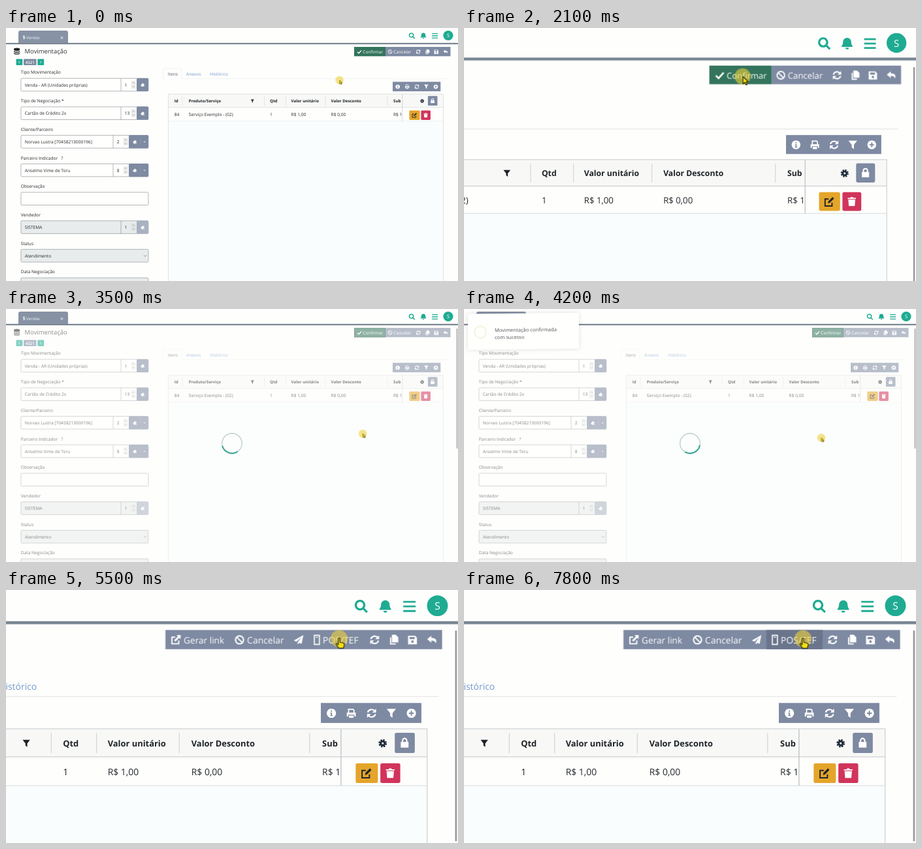
An HTML page that plays this animation: 692 px wide and 388 px high, repeating every 8 s.

```html
<!DOCTYPE html>
<html lang="pt-BR">
<head>
<meta charset="utf-8">
<title>Movimentação</title>
<style>
html, body { margin: 0; width: 100%; height: 100%; overflow: hidden; background: #fefefc; }
svg { display: block; }
#stage { width: 100vw; height: 100vh; }
text { font-family: "Open Sans", "Noto Sans", sans-serif; text-rendering: geometricPrecision; white-space: pre; }
.anim { animation: 8s infinite ease-in-out; }
.step { animation: 8s infinite step-end; }

#camera { transform-origin: 692px 0; animation-name: camera; }
@keyframes camera {
  0%, 12.5% { transform: scale(1); }
  20.6%, 30% { transform: scale(1.99); }
  35.6%, 55% { transform: scale(1); }
  62.5%, 100% { transform: scale(2.1); }
}
#cursor { animation-name: cursor; }
@keyframes cursor {
  0%, 1.25% { transform: translate(510.5px, 80px); }
  5%, 12.5% { transform: translate(530px, 69px); }
  22.5% { transform: translate(566px, 47px); }
  26%, 30% { transform: translate(558.6px, 37.3px); }
  36.2% { transform: translate(543px, 163px); }
  41% { transform: translate(546px, 190px); }
  51%, 53.5% { transform: translate(547px, 197.5px); }
  62.5% { transform: translate(612px, 50px); }
  65% { transform: translate(606px, 36px); }
  68.75% { transform: translate(605.3px, 35.4px); }
  78%, 82.5% { transform: translate(601.1px, 36px); }
  92.5%, 95% { transform: translate(606px, 36.2px); }
  97.4%, 100% { transform: translate(609.6px, 35.5px); }
}
.before { animation-name: before; }
@keyframes before { 0% { opacity: 1; } 53.75%, 100% { opacity: 0; } }
.after { animation-name: after; }
@keyframes after { 0% { opacity: 0; } 53.75%, 100% { opacity: 1; } }
.arrow { animation-name: arrow; }
@keyframes arrow { 0% { opacity: 1; } 65%, 100% { opacity: 0; } }
.hand { animation-name: hand; }
@keyframes hand { 0% { opacity: 0; } 65%, 100% { opacity: 1; } }
#focus { animation-name: focus; }
@keyframes focus { 0% { opacity: 0; } 28.75%, 100% { opacity: 1; } }
#bar { animation-name: bar; }
@keyframes bar { 0% { opacity: 0; } 12.5%, 100% { opacity: 1; } }
#hover { animation-name: hover; }
@keyframes hover { 0%, 68.8% { opacity: 0; } 71.25%, 100% { opacity: 1; } }
#loading { animation-name: loading; }
@keyframes loading { 0%, 37.5% { opacity: 0; } 40%, 53.1% { opacity: 1; } 54.2%, 100% { opacity: 0; } }
#arc { transform-origin: 346px 206px; animation: spin .8s linear infinite; }
@keyframes spin { from { transform: rotate(-80deg); } to { transform: rotate(280deg); } }
#toast { transform-origin: 91px 33px; animation-name: toast; }
@keyframes toast {
  0%, 49.5% { opacity: 0; transform: translateY(-5px) rotate(2deg); }
  51.7% { opacity: 1; transform: rotate(-2deg); }
  53.7% { transform: translateY(2px) rotate(2deg); }
  55.9%, 100% { opacity: 1; transform: none; }
}
#tick { stroke-dasharray: 14; animation-name: tick; }
@keyframes tick { 0%, 52.6% { stroke-dashoffset: 14; opacity: 0; } 53% { opacity: 1; } 57%, 100% { stroke-dashoffset: 0; opacity: 1; } }
</style>
</head>
<body>
<svg id="stage" viewBox="0 0 692 388" preserveAspectRatio="none">
  <g id="camera" class="anim">
    <g id="page"></g>
    <g id="loading" class="anim">
      <path d="M0 25.5H692V388H0z" fill="#fefefc" opacity=".45"/>
      <circle cx="346" cy="206" r="15.3" fill="none" stroke="#bccfcc" stroke-width="1.4"/>
      <path id="arc" d="M361.3 206A15.3 15.3 0 0 1 340.8 220.4" fill="none" stroke="#1f9d88" stroke-width="1.8"/>
    </g>
    <g id="bar" class="step" fill="#8d9299">
      <rect class="step before" x="689.9" y="30" width="1.2" height="184" rx=".6"/>
      <rect class="step after" x="689.9" y="29.5" width="1.2" height="154" rx=".6"/>
    </g>
    <g id="toast" class="anim">
      <rect x="6" y="6" width="170" height="55" rx="2.5" fill="#fffffd" style="filter: drop-shadow(0 0 3px #0002)"/>
      <circle cx="25" cy="34" r="9" fill="none" stroke="#e8efd2" stroke-width="1.3"/>
      <path id="tick" class="anim" d="M20.5 34.5l3.2 3.2 6-6.6" fill="none" stroke="#a5dc86" stroke-width="1.6"/>
      <g id="message"></g>
    </g>
    <g id="cursor" class="anim">
      <circle r="6.2" fill="#efd03a" opacity=".6"/>
      <g transform="translate(.3 .2) scale(.86)" fill="#f4e010" stroke="#23230f" stroke-width=".65" stroke-linejoin="round">
        <path class="step arrow" d="M0 0V6.5L1.6 5.1 2.7 7.5 3.8 7 2.7 4.7H4.8z"/>
        <path class="step hand" d="M-1 0c0-1 1.4-1 1.4 0V3l3 .7c.8.3.8 1 .6 1.8L3.3 8H-.6L-2.8 4.9c-.4-.9.6-1.2 1.1-.6L-1 5z"/>
      </g>
    </g>
  </g>
</svg>
<script>
const SLATE = '#7e8aa2', DARK = '#25292e', TEAL = '#1fab92', LINE = '#d9dcdd';

// Icons on a 16-unit grid: filled path, stroked path, stroke width
const ICONS = {
  check: ['', 'M1.5 8.5l4.5 4.5L14.5 3.5', 2.8],
  ban: ['', 'M8 1.7a6.3 6.3 0 1 0 .01 0zM3.6 3.6l8.8 8.8', 2],
  sync: ['M15 1v6H9zM1 15V9h6z', 'M2 6.8A6.2 6.2 0 0 1 12.8 4.5M14 9.2A6.2 6.2 0 0 1 3.2 11.5', 2.2],
  copy: ['M5 0h6l4 4v8H5z', 'M3 4v10.5h8', 2],
  save: ['M1 1.5h11l3 3v10.5H1zM3.5 3.5v3.5h8V3.5zM8 8.8a2 2 0 1 0 .01 0z'],
  undo: ['M7 1.5L.5 7 7 12.5V9.2c4 0 6 1 7 4.3 2.5-6-1-8.6-7-8.7z'],
  info: ['M8 .8a7.2 7.2 0 1 0 .01 0zM7 3.8h2v2H7zM6.3 7H9v4h1v1.4H6.2V11h1V8.4h-.9z'],
  print: ['M1 7h14v6h-2.2v-2.8H3.2V13H1zM4.5 11.5h7V15h-7z', 'M3.8 7V1.8h7l1.4 1.6V7', 1.8],
  filter: ['M.8 1.2h14.4L9.8 8v7L6.2 12.3V8z'],
  plus: ['M8 .8a7.2 7.2 0 1 0 .01 0zM7 4.2h2V7h2.8v2H9v2.8H7V9H4.2V7H7z'],
  lock: ['M2.5 7h11v8h-11z', 'M5 7.5V5a3 3 0 0 1 6 0v2.5', 2],
  edit: ['M6 10.5l.6-3.3L12.7 1 15 3.3l-6.2 6.2z', 'M12 9.5v4.7H1.8V4H7', 1.8],
  trash: ['M1.5 2.3h4L6.5 1h3l1 1.3h4v1.7h-13zM2.5 5h11l-.8 10.2H3.3z'],
  eraser: ['M.8 9.3L8.2 2l6.6 5.4L9.2 13H15v1.4H4.8z'],
  search: ['', 'M6.5 1.5a5 5 0 1 0 .01 0zM10.2 10.2l4.6 4.6', 2.5],
  bell: ['M8 .5a5.2 5.2 0 0 0-5.2 5.2c0 4-2 4.7-2 6.6h14.4c0-1.9-2-2.6-2-6.6A5.2 5.2 0 0 0 8 .5zM5.8 13.3h4.4a2.2 2.2 0 0 1-4.4 0z'],
  bars: ['', 'M0 2h16M0 8h16M0 14h16', 2.4],
  plane: ['M15.5.5L.5 9l4 2 7.6-7-5.6 8v3.5L9 12.8l3.7 1.5z'],
  phone: ['', 'M4 .8h8v14.4H4zM6.5 3.8h3', 1.7],
  link: ['M9 .5h6.5V7l-2.2-2.2-6 6-2.1-2.1 6-6z', 'M12.5 9v5.2H1.8V3.8H7', 2],
  gear: ['', 'M8 4.3a3.7 3.7 0 1 0 .01 0z', 3.6],
  coins: ['M1 3.5a7 3 0 0 1 14 0v1a7 3 0 0 1-14 0zM1 6.5a7 3 0 0 0 14 0v2.3a7 3 0 0 1-14 0zM1 10.8a7 3 0 0 0 14 0v2a7 3 0 0 1-14 0z'],
  down: ['M1 5h14L8 12z'],
  left: ['', 'M10.5 2.5L5 8l5.5 5.5', 2.6],
  right: ['', 'M5.5 2.5L11 8l-5.5 5.5', 2.6],
  chevron: ['', 'M2 5l6 6 6-6', 2],
  close: ['', 'M3 3l10 10M13 3L3 13', 2.6]
};

const rect = (x, y, w, h, fill, more = '') =>
  `<rect x="${x}" y="${y}" width="${w}" height="${h}" fill="${fill}" ${more}/>`;
const line = (d, color = LINE, w = .6) => `<path d="${d}" fill="none" stroke="${color}" stroke-width="${w}"/>`;
// y is the middle of the capitals
const text = (x, y, s, fill = DARK, size = 6.65, more = '') =>
  `<text x="${x}" y="${y + size * .357}" fill="${fill}" style="font-size:${size}px" ${more}>${s}</text>`;
const bold = (x, y, s) => text(x, y, s, '#1f2328', 6.15, 'font-weight="700"');
function icon(name, x, y, size = 7.4, color = '#fff') {
  const [solid, stroke = '', w = 0] = ICONS[name], k = size / 16;
  const teeth = name === 'gear'
    ? `<circle cx="8" cy="8" r="6.2" fill="none" stroke="${color}" stroke-width="2.8" stroke-dasharray="2.9 1.97"/>` : '';
  return `<g transform="translate(${x - size / 2} ${y - size / 2}) scale(${k})">${teeth}` +
    `<path d="${solid}" fill="${color}" fill-rule="evenodd"/>` +
    `<path d="${stroke}" fill="none" stroke="${color}" stroke-width="${w}"/></g>`;
}
const icons = (list, y, size) => list.map(([name, x]) => icon(name, x, y, size)).join('');

function header() {
  return rect(0, 22.8, 692, 2.2, '#7a8794') +
    `<path d="M19 23V7q0-3 3-3H92q3 0 3 3V23z" fill="#8793a5"/>` +
    text(25.5, 14.5, '$', '#fff', 7.5, 'font-weight="600"') + text(31, 14.8, 'Vendas', '#f1f3f6', 6.1) +
    icon('close', 85.5, 15, 5.5) +
    icon('search', 621.5, 12, 10, TEAL) + icon('bell', 639, 12, 9.6, TEAL) + icon('bars', 656.6, 12, 9, TEAL) +
    `<circle cx="677" cy="11.5" r="7.6" fill="${TEAL}"/>` + text(677, 11.8, 'S', '#fff', 7.5, 'text-anchor="middle"') +
    icon('coins', 16.6, 35.5, 10.5, '#22262a') + text(28.6, 35.6, 'Movimentação', '#30343a', 9.45) +
    rect(15.5, 47.5, 9.8, 9.5, TEAL, 'rx="1"') + icon('left', 20.3, 52.3, 5) +
    rect(27, 47.5, 19.5, 9.5, SLATE, 'rx="1"') + text(36.8, 52.4, '4321', '#fff', 6.1, 'text-anchor="middle" font-weight="600"') +
    rect(48.3, 47.5, 9.8, 9.5, TEAL, 'rx="1"') + icon('right', 53.2, 52.3, 5);
}

const FIELDS = [
  { label: 'Tipo Movimentação', value: 'Venda - AR (Unidades próprias)', num: 1 },
  { label: 'Tipo de Negociação *', value: 'Cartão de Crédito 2x', num: 13 },
  { label: 'Cliente/Parceiro', value: 'Norvao Lustra [70458213000196]', num: 2, menu: true },
  { label: 'Parceiro Indicador   ?', value: 'Anselmo Vime de Toru', num: 8, menu: true },
  { label: 'Observação', value: '' },
  { label: 'Vendedor', value: 'SISTEMA', num: 1, off: true },
  { label: 'Status', value: 'Atendimento', off: true, select: true },
  { label: 'Data Negociação', value: '', off: true }
];

function field({ label, value, num, menu, off, select }, i) {
  const mid = 87 + 43.7 * i, top = mid - 9.8, split = menu ? 164 : 176;
  let out = text(22.8, mid - 18.9, label) +
    rect(22.9, top, 195, 19.6, off ? '#e8ecec' : '#fffffd', 'rx="1.5" stroke="#92979b" stroke-width=".7"') +
    text(28.8, mid + .2, value);
  if (num) {
    out += line(`M${split} ${top}v19.6`, '#92979b', .7) + text(split + 5.7, mid + .2, num) +
      rect(split + 15.5, mid - 6, 7.5, 12, off ? '#dfe3e4' : '#eeeeec') +
      line(`M${split + 17.5} ${mid - 2}l1.7-2 1.7 2M${split + 17.5} ${mid + 2}l1.7 2 1.7-2`, '#a2a6a9', .8) +
      rect(split + 24, top - .3, 194 - split, 20.2, off ? '#a9b2c1' : SLATE, 'rx="1.5"') +
      icon('eraser', split + 33.3, mid + .2, 7);
  }
  if (menu) out += line(`M206 ${top}v19.6`, '#8f9ab0', .5) + icon('down', 212, mid + .3, 3.6);
  if (select) out += icon('chevron', 213, mid + .2, 5, '#4a4f55');
  return out;
}

function toolbars() {
  const common = [['sync', 631.2], ['copy', 645.2], ['save', 658.8], ['undo', 673]];
  return `<g class="step before">` + rect(581, 29, 99.5, 14.3, SLATE) + rect(533, 29, 48, 14.3, '#34745d') +
    `<g id="focus" class="step">` + rect(533.4, 29.4, 47.2, 13.5, 'none', 'stroke="#1d5542" stroke-width=".9"') + `</g>` +
    icons([['check', 541], ['ban', 588], ...common], 36.4) +
    text(546.3, 36.6, 'Confirmar', '#fff', 6.5) + text(593.3, 36.6, 'Cancelar', '#fff') + `</g>` +
    `<g class="step after">` + rect(478.7, 29.2, 201.7, 14, SLATE) +
    `<g id="hover" class="anim">` + rect(582.9, 29.2, 41, 14, '#6a758c') + `</g>` +
    icons([['link', 486.3], ['ban', 532.7], ['plane', 575.8], ['phone', 589.1], ...common], 36.4) +
    text(492, 36.6, 'Gerar link', '#fff', 6.5) + text(538.2, 36.6, 'Cancelar', '#fff') +
    text(593.4, 36.6, 'POS/TEF', '#fff') + `</g>`;
}

function tabs() {
  const blue = '#7299cc';
  return line('M240.5 79.5V64q0-2 2-2H267q2 0 2 2V77.8H678', '#e6e8e7') +
    text(247.8, 70.6, 'Itens', '#56616f') + text(276, 70.6, 'Anexos', blue) +
    `<g class="step before">` + text(312, 70.6, 'Histórico', blue) + `</g>` +
    `<g class="step after">` + text(312, 70.6, 'Parcelas', blue) + text(357.3, 70.6, 'Histórico', blue) + `</g>`;
}

function table() {
  const heads = [[257.8, 'Id'], [279.8, 'Produto/Serviço'], [404, 'Qtd'], [436.6, 'Valor unitário'], [497.6, 'Valor Desconto'], [593, 'Sub']];
  const cells = [[257.8, '84'], [279.8, 'Serviço Exemplo - (02)'], [404, '1'], [436.6, 'R$ 1,00'], [497.6, 'R$ 0,00'], [593, 'R$ 1']];
  return rect(592, 82.5, 73.3, 14.6, SLATE) +
    icons([['info', 599.7], ['print', 614.2], ['sync', 629], ['filter', 643.4], ['plus', 658]], 90, 7.5) +
    rect(248.5, 101.4, 421, 290, '#fafdfe') + rect(248.5, 101.4, 421, 20.3, '#f8f9f7') + rect(248.5, 121.7, 421, 21, '#fefefc') +
    line('M248.5 390V101.4H669.5V390', '#cfd3d5') + line('M248.5 121.8H669.5', '#cdd0d2') + line('M248.5 142.9H669.5', '#dfe2e2') +
    [270, 395.5, 428.5, 488.8, 583.8].map(x => line(`M${x} 104.5v14.5`, '#d3d6d7')).join('') +
    heads.map(([x, s]) => bold(x, 112, s)).join('') + cells.map(([x, s]) => text(x, 133, s)).join('') +
    line('M606.7 101.4V142.9', '#c3c7ca', .7) +
    icon('filter', 377.3, 112, 6, '#1f2328') + icon('gear', 637.1, 112, 6.4, '#1f2a38') +
    rect(645.9, 104.3, 14.6, 14.8, SLATE, 'rx="1.2"') + icon('lock', 653.1, 111.5, 8.2) +
    rect(617.4, 126.5, 16.2, 14.4, '#e5a52a', 'rx="1.3"') + icon('edit', 625.3, 133.9, 8.4, '#22262a') +
    rect(635.4, 126.5, 14.5, 14.4, '#d1345b', 'rx="1.3"') + icon('trash', 642.6, 133.7, 7.8);
}

document.getElementById('page').innerHTML =
  rect(0, 0, 692, 388, '#fefefc') + header() + FIELDS.map(field).join('') + toolbars() + tabs() + table();
document.getElementById('message').innerHTML =
  text(47, 30.8, 'Movimentação confirmada', '#50545a', 7.6) + text(47, 42, 'com sucesso', '#50545a', 7.6);
</script>
</body>
</html>
```
